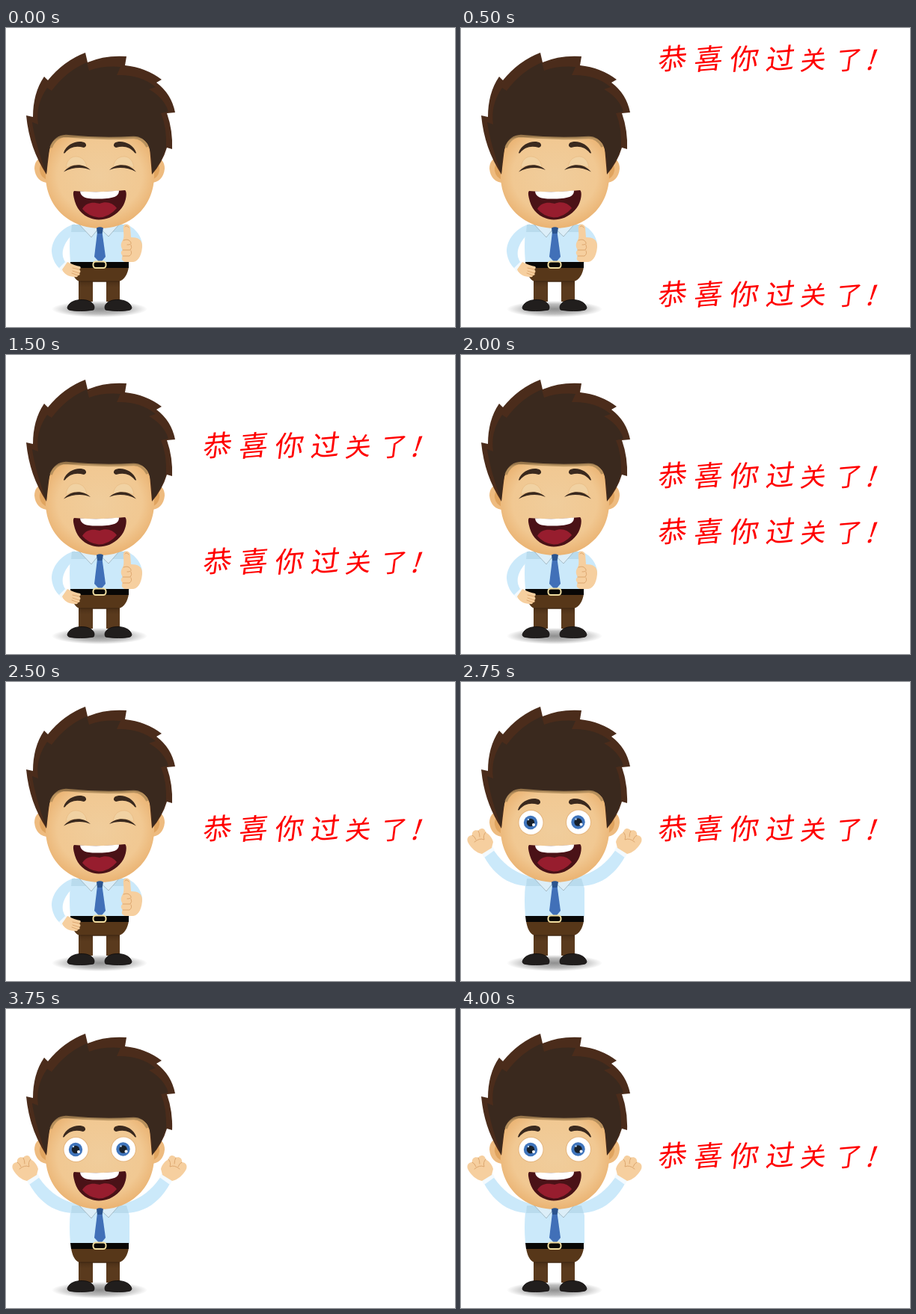
An HTML page that plays this animation: 600x400 px, repeating every 8 s.

```html
<!DOCTYPE html>
<html lang="zh-CN">
<head>
<meta charset="utf-8">
<title>恭喜你过关了!</title>
<style>
  html, body { margin: 0; width: 100%; height: 100%; overflow: hidden; background: #fff; }
  svg { display: block; width: 600px; height: 400px; }
  text { font: 400 38px "Noto Sans CJK SC", "Noto Sans CJK", sans-serif; fill: #f00; }
  .small { font-size: 34px; }
  .mark { font: italic 38px "Noto Serif", serif; }
  .dark { fill: #3a291e; }
  .skin { fill: #f6cf9f; }
  .shirt { fill: #cbe9fa; }
  .cuff { fill: #f3faff; }
  .crease { fill: none; stroke: #dda76f; stroke-width: 1; stroke-linecap: round; }
</style>
</head>
<body>
<svg viewBox="0 0 600 400">
  <defs>
    <radialGradient id="face" cx=".5" cy=".45" r=".6">
      <stop offset="0" stop-color="#f0cd9c"/>
      <stop offset=".65" stop-color="#f1c892"/>
      <stop offset="1" stop-color="#e8ac68"/>
    </radialGradient>
    <radialGradient id="ground">
      <stop offset="0" stop-color="#8f8f8f"/>
      <stop offset=".6" stop-color="#bdbdbd"/>
      <stop offset="1" stop-color="#fff"/>
    </radialGradient>
    <linearGradient id="leg" x2="0" y2="1">
      <stop offset="0" stop-color="#432a14"/>
      <stop offset=".4" stop-color="#5a3a1d"/>
    </linearGradient>
    <path id="brow" d="M77 167C81 154 98 149 106 154Q109 158 104 160C94 157 85 159 79 167Q77 168 77 167Z"/>
    <path id="shoe" d="M82 374C84 366 95 362 107 364C116 366 120 372 117 377C106 379 92 379 84 377Q82 376 82 374Z"/>
    <g id="lid">
      <path d="M80 187C81 176 88 171 95 172C103 173 107 179 108 186Q94 180 80 187Z" fill="#f1d2a3" stroke="#e9bd86" stroke-width=".8"/>
      <path d="M77 192.500C86 181 103 180 113 190C103 185.500 89 186 77 192.500Z" class="dark"/>
    </g>
    <g id="eye">
      <circle cx="93.5" cy="188" r="17" fill="#e5b67f"/>
      <circle cx="93.5" cy="188" r="16" fill="#fff"/>
      <circle cx="93" cy="188" r="9.2" fill="#3f74bb"/>
      <circle cx="93" cy="188" r="5.2" fill="#17202b"/>
      <circle cx="97" cy="191" r="2" fill="#fff"/>
      <circle cx="90" cy="184" r="1.2" fill="#bcd5ee"/>
    </g>
    <g id="ear">
      <path d="M56 176C46 170 38 177 38 188C39 200 46 207 57 207Z" fill="#eebb7f"/>
      <path d="M55 182C48 179 44 184 45 191Q47 201 56 203Z" fill="#d9984f" opacity=".65"/>
    </g>
    <g id="raised">
      <path class="shirt" d="M41 221C55 243 72 257 100 262L92 273C64 273 44 258 30 232Z"/>
      <path class="cuff" d="M28 230L42 220L45 225L31 235Z"/>
      <path class="skin" d="M28 230C21 229 13 222 9 214C7 208 11 205 15 205C14 200 19 197 23 199C27 194 32 196 33 201C38 204 42 209 43 214L41 222Z"/>
      <path class="crease" d="M15 205Q18 206 20 211M23 199Q25 202 25 207M33 201Q29 205 31 211Q25 208 18 214"/>
    </g>
  </defs>

  <ellipse cx="125" cy="376" rx="64" ry="11" fill="url(#ground)"/>

  <g id="armsUp">
    <use href="#raised"/>
    <use href="#raised" transform="matrix(-1 0 0 1 250 0)"/>
  </g>
  <g id="armsDown">
    <path class="shirt" d="M92 262C72 268 61 284 61 299C62 310 67 318 72 322L80 314C74 306 73 294 86 279Z"/>
    <path class="shirt" d="M158 262C173 266 183 280 182 294L164 296Z"/>
  </g>

  <path d="M97 334H116V366H97ZM134 334H152V366H134Z" fill="url(#leg)"/>
  <path d="M87 319H164C163 329 158 337 151 339H98C92 337 88 329 87 319Z" fill="#573719"/>
  <path d="M98 339H151" stroke="#432a14" stroke-width="1.5"/>
  <g fill="#211e1d" stroke="#0c0a09" stroke-width=".8">
    <use href="#shoe"/>
    <use href="#shoe" transform="matrix(-1 0 0 1 250 0)"/>
  </g>

  <path class="shirt" d="M88 263H161L165 276V314H86Q84 290 86 272Z"/>
  <path d="M88 263H161L164 273H87Z" fill="#b3d6e9" opacity=".7"/>
  <path d="M98 263L114 280L124.500 267L137 279L151 263Z" fill="#dceef8" stroke="#9bb0ba" stroke-width=".8"/>
  <path d="M122 273H128.500L133 306L126 314.500L118 306Z" fill="#4170b8"/>
  <path d="M86 313H164V321H87Z" fill="#080706"/>
  <rect x="116.500" y="312.500" width="17" height="8.500" rx="3.500" fill="#080706" stroke="#f0dda0" stroke-width="2"/>

  <use href="#ear"/>
  <use href="#ear" transform="matrix(-1 0 0 1 250 0)"/>
  <path fill="url(#face)" d="M53 190C53 160 58 140 76 140H176C191 143 198 165 198 195C199 239 166 268 126 268C84 268 50 238 53 190Z"/>
  <path d="M121 267.500Q125.500 265 130 267.500L128.500 275H122Z" fill="#2b548f"/>

  <path fill="#4b2c1b" d="M54 196C39 172 30 148 27 117L36 119Q36 87 51 65L56 70Q77 44 106 33L109 46Q132 36 161 38L159 50Q187 53 208 69L201 73Q221 88 226 113L215 114Q223 137 222 162L215 160Q209 180 195 196L192 160Q186 146 172 146H76Q60 148 58 162Z"/>
  <path class="dark" d="M54 195C44 168 37 142 35 126L43 129Q39 103 55 80L61 84Q80 58 108 46L111 57Q130 50 153 52L148 63Q180 62 200 79L191 82Q211 93 217 112L207 114Q215 133 214 159Q208 179 195 195Q196 168 189 155Q183 145 170 146Q124 149 80 143Q65 144 60 157Q55 169 54 195Z"/>
  <path d="M60 160Q66 145 80 144.500Q124 149 170 146.500Q182 146 189 159" fill="none" stroke="#aa8757" stroke-width="3.500" opacity=".8"/>

  <g id="happy">
    <use href="#brow" class="dark"/>
    <use href="#brow" class="dark" transform="matrix(-1 0 0 1 251 0)"/>
    <use href="#lid"/>
    <use href="#lid" transform="matrix(-1 0 0 1 251 0)"/>
  </g>
  <g id="awake">
    <use href="#brow" class="dark" transform="translate(-1 4)"/>
    <use href="#brow" class="dark" transform="matrix(-1 0 0 1 251 4)"/>
    <use href="#eye"/>
    <use href="#eye" transform="translate(63.500 -.5)"/>
  </g>

  <path d="M91 218Q125 221 159 217C162 219 161 229 157 237C150 249 138 256.500 124 256.500C108 256 96 246 92 232C90 225 89 220 91 218Z" fill="#4a1217"/>
  <path d="M102 242C108 232 118 233 125 235C134 231 143 234 148 241Q138 253 124 253.500Q110 252 102 242Z" fill="#971d2e"/>
  <path d="M99 218.500Q126 220.500 151 217.500C151 225 145 228 125 228.500C108 229 100 227 99 218.500Z" fill="#fff"/>

  <g id="handsDown">
    <path class="cuff" d="M71 321L80 312L83 316L74 326Z"/>
    <path class="skin" d="M75 323L82 313Q92 318 99 319Q101 321 98 323Q101 326 98 328Q100 331 96 331Q96 334 92 333C84 333 77 329 75 323Z"/>
    <path class="crease" d="M98 323L89 321M98 328L89 325M96 331L88 328"/>
    <path class="skin" d="M156 284C159 278 156 270 157 265C159 261 165 262 166 267L167 280C176 280 182 283 182 291C182 301 178 312 170 313L159 313C154 311 154 308 156 305C153 302 153 299 156 297C153 293 153 288 156 284Z"/>
    <path class="crease" d="M157 284Q164 281 167 287Q168 290 162 290M156 297H166Q169 294 167 290M156 305H165Q169 302 167 298M159 266Q161 263 164 267"/>
  </g>

  <text id="upper" x="262 310 358 406 452 500 541" rotate="-5">恭喜你过<tspan class="small">关了</tspan><tspan class="mark">!</tspan></text>
  <text id="lower" x="262 310 358 406 452 500 541" rotate="-5">恭喜你过<tspan class="small">关了</tspan><tspan class="mark">!</tspan></text>
</svg>
<script>
  const LOOP = 8000, TICK = 250, STEP = 20;
  const MEET = 10, SWAP = 11, BLINKS = [13, 15];
  const $ = id => document.getElementById(id);

  function show(on, ...ids) {
    for (const id of ids) $(id).style.display = on ? "" : "none";
  }

  function place(id, top) {
    $(id).setAttribute("transform", `translate(0 ${top + 36.5}) skewX(-12)`);
  }

  function draw(time) {
    const tick = Math.floor(time % LOOP / TICK);
    const shift = STEP * (Math.min(tick, MEET) - 1);
    place("upper", shift);
    place("lower", 355 - shift);
    show(tick > 0 && tick < MEET, "upper");
    show(tick > 0 && !BLINKS.includes(tick), "lower");
    show(tick < SWAP, "armsDown", "handsDown", "happy");
    show(tick >= SWAP, "armsUp", "awake");
  }

  const start = performance.now();
  function frame() {
    draw(performance.now() - start);
    requestAnimationFrame(frame);
  }
  frame();
</script>
</body>
</html>
```
